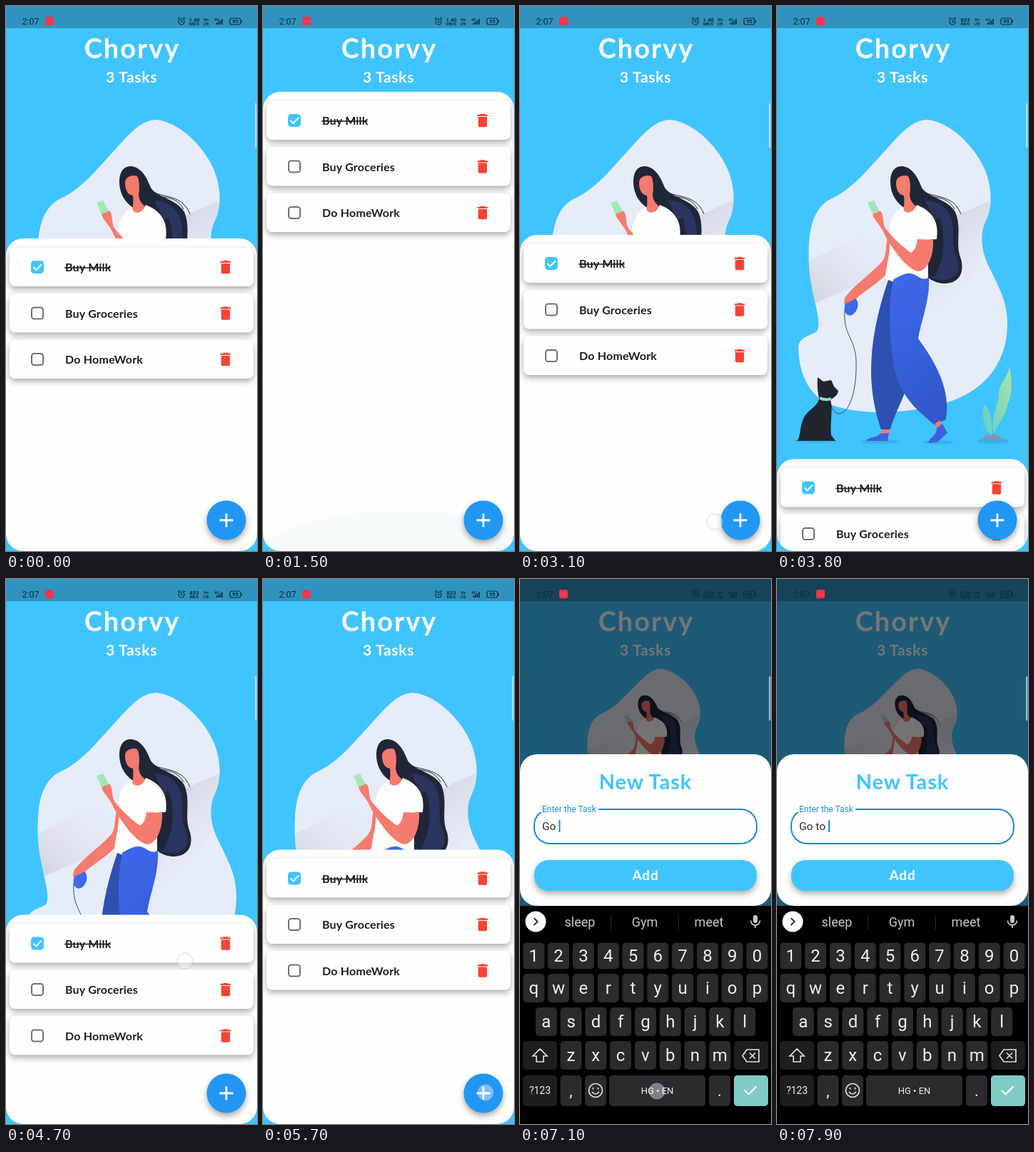
Recreate the animation shown at these times as an HTML page. Size 352x762 px, loop 8 s.

```html
<!DOCTYPE html>
<html lang="en">
<head>
<meta charset="utf-8">
<title>Task list</title>
<style>
  html, body { margin: 0; width: 100%; height: 100%; overflow: hidden; background: #40c4ff; }
  svg { display: block; width: 100%; height: 100%; font-family: Roboto, sans-serif; }
  text { white-space: pre; }
  .round { font-family: Lato, sans-serif; font-weight: 700; }
  .mid { text-anchor: middle; }
  .card { filter: drop-shadow(0 4px 4px rgba(0, 0, 0, .32)); }
  .fab { filter: drop-shadow(0 4px 4px rgba(0, 0, 0, .35)); }
</style>
</head>
<body>
<svg id="stage" viewBox="0 0 352 762">
  <defs>
    <clipPath id="sheetClip"><rect id="clipBox" width="352" rx="24"/></clipPath>
    <clipPath id="blobClip"><use href="#blob"/></clipPath>
    <linearGradient id="grainL" x1="0" y1="1" x2=".9" y2="0">
      <stop offset="0" stop-color="#cfd1dc"/><stop offset="1" stop-color="#e6ebf8" stop-opacity=".2"/>
    </linearGradient>
    <linearGradient id="grainR" x1=".2" y1="0" x2=".6" y2="1">
      <stop offset="0" stop-color="#cfd1dc"/><stop offset="1" stop-color="#e6ebf8" stop-opacity="0"/>
    </linearGradient>
    <linearGradient id="denim" x1="0" y1="0" x2=".3" y2="1">
      <stop offset="0" stop-color="#3e68ee"/><stop offset="1" stop-color="#3159cb"/>
    </linearGradient>
    <linearGradient id="leaf" x1="0" y1="1" x2="1" y2="0">
      <stop offset="0" stop-color="#62cfc4"/><stop offset="1" stop-color="#a9e3a6"/>
    </linearGradient>
  </defs>

  <rect width="352" height="762" fill="#40c4ff"/>
  <g class="round mid" fill="#fff">
    <text x="177" y="73" font-size="38" letter-spacing="2">Chorvy</text>
    <text x="176" y="107" font-size="21" letter-spacing=".7">3 Tasks</text>
  </g>

  <g id="art">
    <path id="blob" fill="#e6ebf8" d="M210 159C245 162 280 200 292 230C302 255 302 282 293 300C284 318 286 340 296 362C312 395 324 415 323 447C322 500 290 543 225 558C175 571 110 572 72 556C40 542 30 505 30 477C31 462 48 461 56 455C64 440 48 405 45 365C43 325 46 285 75 270C108 255 128 227 151 203C172 180 188 160 210 159Z"/>
    <g clip-path="url(#blobClip)">
      <path fill="url(#grainL)" d="M40 358C75 345 95 325 128 319L150 335L142 366C115 395 85 400 40 422Z"/>
      <path fill="url(#grainR)" d="M304 270C280 280 262 288 248 295L212 390L214 432C250 410 285 370 304 320Z"/>
    </g>
    <g fill="#36b2ea">
      <ellipse cx="55" cy="608" rx="30" ry="3"/><ellipse cx="145" cy="609" rx="28" ry="3"/>
      <ellipse cx="226" cy="610" rx="22" ry="3"/><ellipse cx="303" cy="608" rx="22" ry="4"/>
    </g>
    <path fill="#202638" d="M159 243C160 229 167 224 175 224C189 225 197 238 203 254C212 268 240 270 250 288C260 312 249 332 258 354C264 376 252 389 233 388C220 387 210 380 205 372L185 285C168 279 158 262 159 243Z"/>
    <path fill="#29345f" d="M208 272C228 272 240 284 245 298C250 318 245 332 250 346C259 364 256 380 236 383C224 384 216 380 213 376C228 358 233 330 224 305Z"/>
    <path fill="#202638" d="M228 296C238 325 234 356 220 380L210 372C224 350 226 325 220 300Z"/>
    <path fill="none" stroke="#202638" d="M200 256C215 270 246 260 258 291M204 262C220 270 238 264 249 284"/>
    <path fill="#f47b6d" d="M167 247C167 239 177 235 184 238C188 245 187 258 186 264C187 274 192 278 198 282C192 294 179 293 177 288C178 280 179 272 178 265C170 264 167 256 167 247Z"/>
    <path fill="#2e50b3" d="M156 383C140 430 132 470 132 510C132 545 140 575 146 592L159 592C164 570 182 545 189 505L200 400Z"/>
    <path fill="url(#denim)" d="M164 380C175 370 200 372 213 380C215 410 202 440 198 465C214 487 245 530 237 578L221 586C206 572 174 552 164 505C156 455 156 410 164 380Z"/>
    <path fill="#f47b6d" d="M147 592h11l-1 7h-12ZM221 584l8-5 2 9-7 2Z"/>
    <path fill="#3d62e0" d="M144 598L157 597L155 608H125C129 602 140 604 144 598ZM224 590L232 584L239 597L225 610L212 611C215 602 223 602 224 590Z"/>
    <path fill="#f47b6d" d="M157 316C150 340 156 350 144 361C130 376 108 390 97 406C91 415 95 422 103 418L113 407C130 394 150 382 161 366L176 330Z"/>
    <path fill="#fefefc" d="M176 282C162 288 155 308 158 325C160 345 152 365 152 380C163 390 172 372 188 374C198 376 202 385 212 380C212 362 212 345 210 327L224 326C227 305 221 288 196 278C192 290 180 293 176 282Z"/>
    <path fill="#f47b6d" d="M197 326L219 327C220 350 211 370 198 371C182 368 163 341 151 320C147 307 134 298 134 290C139 291 142 282 147 289C150 297 148 306 153 312C164 326 178 338 188 345C194 341 196 334 197 326Z"/>
    <path fill="#a5e5b4" d="M127 275L136 272L144 287L134 291Z"/>
    <ellipse cx="104" cy="420" rx="9" ry="13" transform="rotate(18 104 420)" fill="#3f68ea"/>
    <path fill="#f47b6d" d="M95 408C100 399 110 400 114 407L97 416Z"/>
    <path fill="none" stroke="#2c4f70" d="M95 425C93 462 108 460 111 495C112 530 105 566 88 570C80 570 76 562 74 552"/>
    <path fill="#21262e" d="M28 608C34 602 31 588 38 575C45 563 57 560 59 549C57 540 56 530 57 519L65 525L76 523L80 532L86 538C85 546 79 547 75 551C79 565 74 580 76 600L82 608Z"/>
    <path fill="none" stroke="#93dfc0" stroke-width="4" d="M60 548Q68 552 76 549"/>
    <path fill="#8295b3" d="M287 607C291 597 311 595 316 607Z"/>
    <path fill="url(#leaf)" d="M304 599C299 572 310 563 311 544C311 526 321 526 326 504C331 530 329 545 323 558C321 574 312 578 304 599ZM301 601C287 588 287 570 291 556C301 570 302 585 301 601Z"/>
  </g>

  <g clip-path="url(#sheetClip)">
    <rect width="352" height="762" fill="#fefefc"/>
    <ellipse id="glow" cx="195" cy="800" rx="230" ry="95" fill="#2196f3"/>
    <g id="list"></g>
  </g>

  <g id="fab">
    <circle class="fab" cx="309" cy="719" r="27.5" fill="#2196f3"/>
    <path stroke="#fff" stroke-width="2.8" d="M299.500 719h19M309 709.500v19"/>
  </g>

  <rect width="352" height="31" fill="#000" opacity=".25"/>
  <rect id="dim" width="352" height="762"/>

  <g id="modal">
    <rect y="245" width="352" height="212" rx="24" fill="#fefefe"/>
    <g class="round mid">
      <text x="176" y="294" font-size="29" letter-spacing=".9" fill="#40c4ff">New Task</text>
      <rect class="card" x="20" y="393" width="312" height="43" rx="20" fill="#40c4ff"/>
      <text x="176" y="421" font-size="19" letter-spacing=".8" fill="#fff">Add</text>
    </g>
    <rect x="20" y="322" width="312" height="48" rx="22" fill="none" stroke="#2088d6" stroke-width="2"/>
    <rect x="28" y="318" width="82" height="8" fill="#fefefe"/>
    <text x="31" y="326" font-size="12" fill="#2088d6">Enter the Task</text>
    <text id="entry" x="31" y="350.500" font-size="15.500" fill="#2b2b2b"></text>
    <rect id="caret" y="337" width="2" height="17" fill="#2088d6"/>
  </g>

  <g id="board">
    <rect y="457" width="352" height="305"/>
    <circle cx="22" cy="479" r="14.500" fill="#fff"/>
    <path id="chevron" fill="none" stroke="#333" stroke-width="2" d="M24.500 474l-5 5 5 5"/>
    <g id="tools" fill="none" stroke="#b8bbbf" stroke-width="1.600">
      <path d="M66 471h11q2 0 2 2v8l-6 6h-7q-2 0-2-2v-12q0-2 2-2ZM73 487v-4q0-2 2-2h4M68 476v1M75 476v1M68 481q3 3 5 0"/>
      <circle cx="169" cy="479" r="4.500" stroke-width="3.500"/>
      <circle cx="169" cy="479" r="7" stroke-width="2.600" stroke-dasharray="2.750"/>
      <rect x="211" y="472" width="15" height="15" rx="1" fill="#a0a3a7" stroke="none"/>
      <path stroke="#333" d="M249 470v18"/>
      <path stroke-width="3" stroke-linecap="round" d="M274.500 479h0M280 479h0M285.500 479h0"/>
      <text class="mid" x="120" y="483.500" font-size="13" font-weight="700" fill="#b8bbbf" stroke="none">GIF</text>
    </g>
    <g id="words" class="mid" font-size="18" fill="#c6c8ca">
      <text x="84" y="486">sleep</text><text x="175" y="486">Gym</text><text x="265" y="486">meet</text>
      <path stroke="#2c2c2c" d="M127.500 470v20M222.500 470v20"/>
    </g>
    <g fill="none" stroke="#c6c8ca" stroke-width="1.800">
      <rect x="327" y="470" width="6" height="11" rx="3" fill="#c6c8ca" stroke="none"/>
      <path d="M323.500 477.500a6.500 6.500 0 0 0 13 0M330 484v4"/>
    </g>
    <g id="keys"></g>
    <g fill="none" stroke="#e0e0e0" stroke-width="1.700">
      <path d="M28 657l-10 10h5v8h10v-8h5ZM318 658h17v17h-17l-6-8.500ZM322 662.500l8 8M330 662.500l-8 8"/>
      <circle cx="106" cy="715" r="9.500"/>
      <path d="M101 717q5 6 10 0M102.500 711v2.500M109.500 711v2.500"/>
      <path stroke="#fff" stroke-width="2.200" d="M315 715l5.500 5.500 11-11"/>
    </g>
  </g>

  <g fill="#0d2c3b" class="mid">
    <text x="34.500" y="26" font-size="12.500">2:07</text>
    <rect x="55" y="15" width="12" height="12" rx="3" fill="#f5364b"/>
    <g fill="none" stroke="#0d2c3b" stroke-width="1.200">
      <circle cx="246" cy="22" r="4"/><path d="M246 19.500v3h2M241 18l2.500-2M251 18l-2.500-2"/>
      <rect x="314" y="17" width="15" height="9" rx="3"/><path d="M330.500 20v3"/>
    </g>
    <path stroke="#0d2c3b" stroke-width="1.600" d="M295.500 26v-3M298 26v-4M300.500 26v-6M303 26v-8"/>
    <g font-weight="700">
      <text id="rate" x="264" y="21.500" font-size="7.500"></text>
      <text id="unit" x="264" y="27" font-size="5.500"></text>
      <text x="280.500" y="21" font-size="6">Vo</text><text x="280.500" y="26.500" font-size="5">LTE</text>
      <text x="295.500" y="20.500" font-size="5.500">4G</text><text x="321.500" y="24.300" font-size="7.500">95</text>
    </g>
  </g>
  <rect x="349" y="136" width="2.500" height="62" rx="1" fill="#d9f0fb" opacity=".65"/>
  <circle id="touch" r="11" fill="#fff" fill-opacity=".4" stroke="#b9b7cc" stroke-opacity=".55"/>
</svg>

<script>
const $ = id => document.getElementById(id);
const LOOP = 8000;

function add(parent, tag, attrs, text) {
  const node = document.createElementNS('http://www.w3.org/2000/svg', tag);
  for (const k in attrs) node.setAttribute(k, attrs[k]);
  if (text) node.textContent = text;
  return parent.appendChild(node);
}

// Task cards
['Buy Milk', 'Buy Groceries', 'Do HomeWork'].forEach((name, i) => {
  const g = add($('list'), 'g', { transform: `translate(0 ${12.5 + i * 64.5})` });
  const done = i === 0;
  add(g, 'rect', { class: 'card', x: 5, width: 342, height: 54.5, rx: 8, fill: '#fefefd' });
  add(g, 'rect', { x: 36, y: 19.5, width: 16, height: 16, rx: 3.5, 'stroke-width': 2,
    fill: done ? '#40c4ff' : 'none', stroke: done ? '#40c4ff' : '#707070' });
  add(g, 'text', { class: 'round', x: 83, y: 33.5, 'font-size': 16, 'letter-spacing': .2,
    fill: '#1d1d1d' }, name);
  if (done) {
    add(g, 'path', { d: 'M38.5 27.500l4 4 7.500-8', fill: 'none', stroke: '#fff', 'stroke-width': 2 });
    add(g, 'path', { d: 'M82 28.500h64.500', stroke: '#1d1d1d', 'stroke-width': 1.3 });
  }
  add(g, 'path', { transform: 'translate(295.600 15.200) scale(1.030)', fill: '#f44336',
    d: 'M6 19c0 1.100.9 2 2 2h8c1.100 0 2-.9 2-2V7H6zM19 4h-3.500l-1-1h-5l-1 1H5v2h14z' });
});

// Keyboard
function key(x, y, w, h, label = '', size = 24, fill = '#2a2b2d') {
  add($('keys'), 'rect', { x: x - w / 2, y: y - h / 2, width: w, height: h, rx: 5, fill });
  add($('keys'), 'text', { class: 'mid', x, y: y + size * .35, 'font-size': size, fill: '#f0f0f0' }, label);
}
const rows = [['1234567890', 19.3, 527, 37], ['qwertyuiop', 19.3, 572, 40],
              ['asdfghjkl', 36.8, 619, 40], ['zxcvbnm', 71.5, 666, 40]];
for (const [chars, x, y, h] of rows)
  [...chars].forEach((c, i) => key(x + i * 34.8, y, 30, h, c));
key(28, 666, 48, 40, '', 1, '#1d1e20');
key(324, 666, 48, 40, '', 1, '#1d1e20');
key(28, 715.5, 48, 43, '?123', 14, '#1d1e20');
key(71.5, 715.5, 30, 43, ',', 22);
key(106, 715.5, 30, 43);
key(192.5, 715.5, 135, 43, 'HG • EN', 13);
key(280, 715.5, 30, 43, '.', 22);
key(324, 715.5, 48, 43, '', 1, '#80cbc4');

// [time, sheet top]
const sheetPath = [[0, 325], [700, 275], [1500, 120], [2800, 120], [3100, 320], [3550, 633.5],
                   [3950, 633.5], [4700, 469.5], [5300, 378.5], [LOOP, 378.5]];
const glowPath = [[0, 0], [1450, 0], [1600, .08], [1900, 0], [2500, 0], [2650, .08], [2800, .08],
                  [3000, 0], [LOOP, 0]];
// [time, x, y] of each key tap
const typed = 'Go to ';
const taps = [[6600, 176, 619], [6850, 298, 572], [7100, 192, 716],
              [7350, 158, 572], [7550, 298, 572], [7750, 192, 716]];
// [start, end, x, y from, y to]
const touches = [[800, 1500, 260, 702, 547], [2500, 2700, 273, 560, 547], [2700, 2800, 273, 547, 547],
  [2800, 3150, 273, 547, 750], [3950, 4700, 251, 698, 534], [4700, 5300, 251, 534, 443],
  [5600, 5800, 312, 718, 718], ...taps.map(([t, x, y]) => [t - 50, t + 60, x, y, y])];

const ramp = (t, a, b) => Math.min(1, Math.max(0, (t - a) / (b - a)));
const easeOut = p => 1 - (1 - p) ** 3;
const mix = (a, b, p) => a + (b - a) * p;
const set = (id, attrs) => { for (const k in attrs) $(id).setAttribute(k, attrs[k]); };
const show = (id, on) => { $(id).style.display = on ? '' : 'none'; };

function track(points, t) {
  const i = points.findIndex(p => p[0] > t);
  const [a, b] = [points[i - 1], points[i]];
  return mix(a[1], b[1], ramp(t, a[0], b[0]));
}

function draw(t) {
  const top = track(sheetPath, t);
  const open = easeOut(ramp(t, 5780, 6080));
  const lift = easeOut(ramp(t, 5850, 6090));

  set('clipBox', { y: top, height: 762 - 305 * lift - top });
  set('list', { transform: `translate(0 ${top})` });
  set('glow', { opacity: track(glowPath, t) });
  set('fab', { transform: `translate(0 ${-305 * lift})` });
  set('art', { transform: `translate(176 ${mix(160, 126, lift)}) ` +
    `scale(${mix(1, .62, lift)} ${mix(1, .57, lift)}) translate(-176 -160)` });

  set('dim', { opacity: .54 * open });
  set('modal', { transform: `translate(0 ${517 * (1 - open)})` });
  set('board', { transform: `translate(0 ${305 * (1 - lift)})` });
  show('modal', open > 0);
  show('board', lift > 0);

  const count = taps.filter(p => p[0] <= t).length;
  $('entry').textContent = typed.slice(0, count);
  const since = count ? t - taps[count - 1][0] : t - 6050;
  set('caret', { x: 31.2 + (count ? $('entry').getComputedTextLength() : 0) });
  show('caret', since < 0 || since % 1000 < 500);
  show('tools', !count);
  show('words', count);
  set('chevron', { transform: count ? 'rotate(180 22 479)' : '' });

  const [rate, unit] = t < 3300 ? ['1.40', 'MB/S'] : t < 7000 ? ['833', 'KB/S'] : ['1.20', 'MB/S'];
  $('rate').textContent = rate;
  $('unit').textContent = unit;

  const touch = touches.find(p => t >= p[0] && t < p[1]);
  show('touch', touch);
  if (touch) {
    const [a, b, x, y0, y1] = touch;
    set('touch', { cx: x, cy: mix(y0, y1, ramp(t, a, b)) });
  }
}

let start;
function frame(now) {
  start ??= now;
  draw((now - start) % LOOP);
  requestAnimationFrame(frame);
}
draw(0);
requestAnimationFrame(frame);
</script>
</body>
</html>
```
